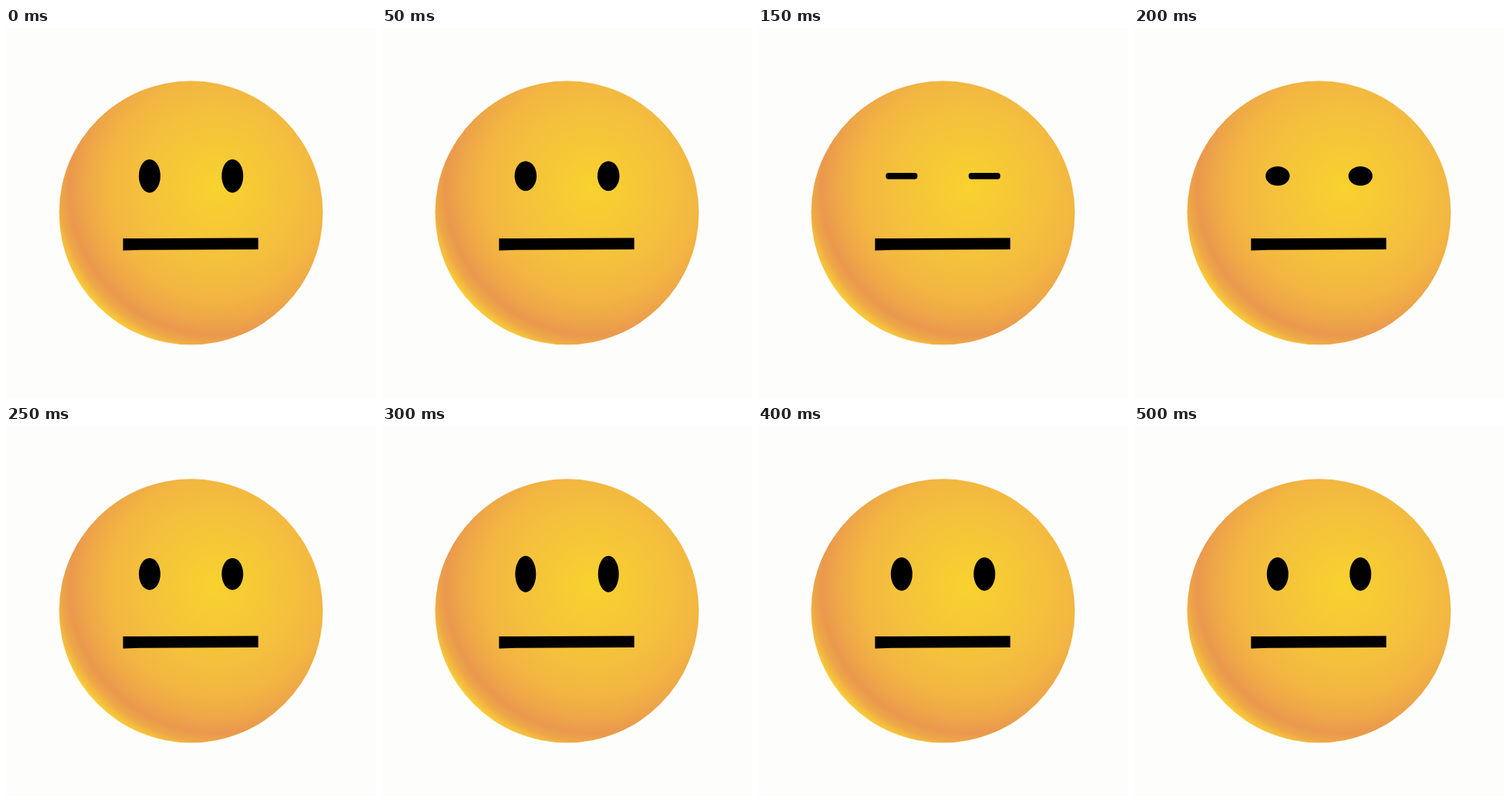
Write an HTML page that moves like this. It is 498 px wide and 498 px high and loops after 1.95 s.

```html
<!DOCTYPE html>
<html lang="en">
<head>
<meta charset="utf-8">
<title>Blinking face</title>
<style>
  html, body { margin: 0; width: 100%; height: 100%; overflow: hidden; background: #fdfefc; }
  svg { display: block; width: 100vw; height: 100vh; }
</style>
</head>
<body>
<svg viewBox="0 0 498 498">
  <defs>
    <radialGradient id="skin" gradientUnits="userSpaceOnUse" cx="284" cy="215" r="230">
      <stop offset="0" stop-color="#f8d22e"/>
      <stop offset=".2" stop-color="#f6ca35"/>
      <stop offset=".45" stop-color="#f4c03d"/>
      <stop offset=".65" stop-color="#f2b542"/>
      <stop offset=".78" stop-color="#eea648"/>
      <stop offset=".865" stop-color="#ea984d"/>
      <stop offset=".92" stop-color="#eea846"/>
      <stop offset=".975" stop-color="#f8c93a"/>
      <stop offset="1" stop-color="#fad433"/>
    </radialGradient>
  </defs>
  <circle cx="249" cy="248.8" r="177.5" fill="url(#skin)"/>
  <path d="M157.5 283.2 L180 283.2 L339.5 282.5 V298 L180 298.8 L157.5 299.5 Z"/>
  <rect class="eye"/>
  <rect class="eye"/>
</svg>
<script>
  const LOOP = 1950, STEP = 50, EYE_Y = 199.2;
  const eyeX = [193.3, 304.8];
  const eyes = document.querySelectorAll('.eye');

  // Half width and half height of the eyes at each step, with an optional corner radius.
  const poses = [
    [14.5, 22.5], [14.8, 20], [16.5, 12.2], [21.3, 4.2, 3.6], [16.2, 13],
    [14.5, 21.5], [14, 24.5], [14.2, 23.7], [14.5, 22.5], [14.5, 22.3], [14.5, 22.5]
  ];

  function draw(time) {
    const step = Math.floor((time % LOOP) / STEP);
    const [w, h, corner] = poses[Math.min(step, poses.length - 1)];
    eyes.forEach((eye, i) => {
      const box = {
        x: eyeX[i] - w, y: EYE_Y - h, width: 2 * w, height: 2 * h,
        rx: corner ?? w, ry: corner ?? h
      };
      for (const key in box) eye.setAttribute(key, box[key]);
    });
  }

  const start = performance.now();
  function tick() {
    draw(performance.now() - start);
    requestAnimationFrame(tick);
  }
  tick();
</script>
</body>
</html>
```
